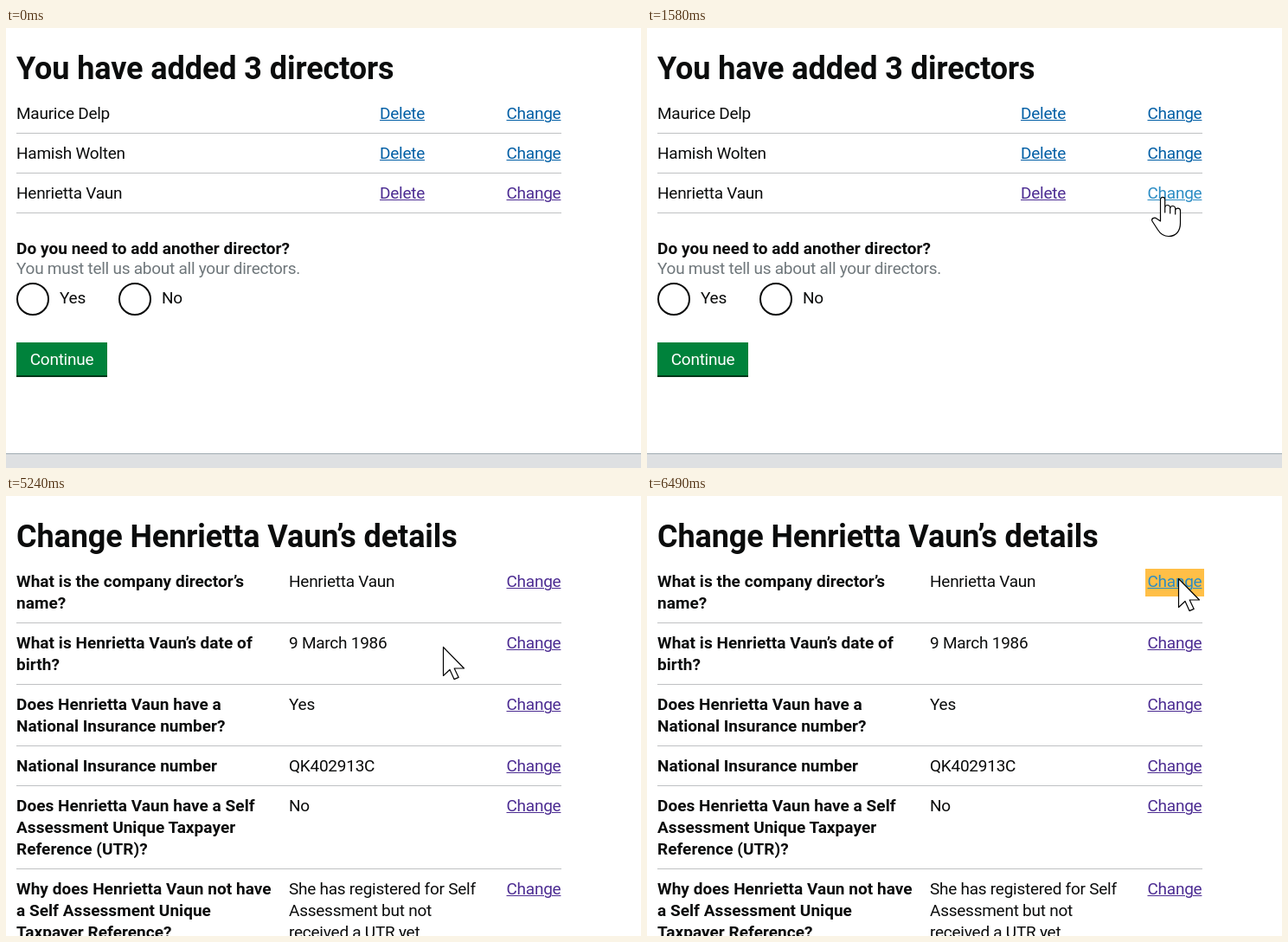
Animation of 734x508 px, one loop 8 s. Source, as an HTML page:

```html
<!DOCTYPE html>
<html lang="en">
<head>
<meta charset="utf-8">
<style>
html, body { margin: 0; width: 100%; height: 100%; overflow: hidden; background: #fff; }
#stage { position: relative; width: 734px; height: 508px; overflow: hidden; color: #0b0c0c; font: 19px/25px Roboto, sans-serif; letter-spacing: -.25px; white-space: pre; }
.page, .at { position: absolute; }
.page { inset: 0; }
h1 { position: absolute; left: 12px; top: 27px; margin: 0; font-size: 36px; line-height: 40px; letter-spacing: -.1px; }
.rows { position: absolute; left: 12px; top: 76px; width: 630px; }
.row { position: relative; padding: 10px 0; border-bottom: 1px solid #bfc1c3; }
.row span, .row a { position: absolute; top: 10px; }
b { letter-spacing: .04px; }
a { color: #005ea5; text-decoration: underline 1px; text-underline-offset: 1px; z-index: 0; }
a.visited { color: #4c2c92; }
a.hover { color: #2b8cc4; }
a.focus::before { content: ""; position: absolute; inset: -2px -3px -5px; background: #ffbf47; z-index: -1; }
.radio { width: 34px; height: 34px; border: 2px solid #0b0c0c; border-radius: 50%; top: 294px; }
.button { left: 12px; top: 363px; width: 105px; height: 38px; line-height: 39px; text-align: center; color: #fff; background: #00823b; border-bottom: 2px solid #003618; }
.footer { left: 0; right: 0; top: 491px; height: 17px; background: #dee0e2; border-top: 1px solid #a1acb2; }
svg { position: absolute; left: 0; top: 0; overflow: visible; fill: #fff; stroke: #000; stroke-width: 1.2; stroke-linejoin: round; }
</style>
</head>
<body>
<div id="stage">
  <div class="page" id="list">
    <h1>You have added 3 directors</h1>
    <div class="rows"></div>
    <b class="at" style="left:12px;top:242px">Do you need to add another director?</b>
    <div class="at" style="left:12px;top:265px;color:#6f777b">You must tell us about all your directors.</div>
    <div class="at radio" style="left:12px"></div><div class="at" style="left:62px;top:299px">Yes</div>
    <div class="at radio" style="left:130px"></div><div class="at" style="left:180px;top:299px">No</div>
    <div class="at button">Continue</div>
    <div class="at footer"></div>
  </div>
  <div class="page" id="details">
    <h1></h1>
    <div class="rows"></div>
  </div>
  <svg width="1" height="1">
    <path id="arrow" d="M.5.5V33.5L8 26.5 13 37.6 18.2 35.4 13.2 25H24.5Z"/>
    <path id="hand" d="M-2.5 28V3a2.6 2.6 0 0 1 5.2 0V18V12.5a3 3 0 0 1 6 0V19V13.5a3 3 0 0 1 6 0V20V16a2.8 2.8 0 0 1 5.8 0V30C20.5 40 15 45.5 7 45.5C0 45.5-3 42-5.5 38L-12 28C-13.5 25-9.5 23-7 25Z"/>
  </svg>
</div>
<script>
const LOOP = 8000, PAGE_CHANGE = 4320;
const person = "Henrietta Vaun";
const $ = selector => document.querySelector(selector);

const cell = (x, text) => `<span style="left:${x}px">${text}</span>`;
const link = (x, text, visited) => `<a class="${visited ? "visited" : ""}" style="left:${x}px">${text}</a>`;
const row = (head, rest) => `<div class="row">${head}${rest}</div>`;

$("#list .rows").innerHTML = ["Maurice Delp", "Hamish Wolten", person].map((name, i) =>
  row(name, link(420, "Delete", i == 2) + link(566.5, "Change", i == 2))).join("");

$("#details h1").textContent = `Change ${person}’s details`;
$("#details .rows").innerHTML = [
  ["What is the company director’s\nname?", person],
  [`What is ${person}’s date of\nbirth?`, "9 March 1986"],
  [`Does ${person} have a\nNational Insurance number?`, "Yes"],
  ["National Insurance number", "QK402913C"],
  [`Does ${person} have a Self\nAssessment Unique Taxpayer\nReference (UTR)?`, "No"],
  [`Why does ${person} not have\na Self Assessment Unique\nTaxpayer Reference?`,
    "She has registered for Self\nAssessment but not\nreceived a UTR yet"]
].map(([question, answer]) =>
  row(`<b>${question}</b>`, cell(315, answer) + link(566.5, "Change", true))).join("");

// Each pointer stroke is a quadratic curve: from, bend, to
const strokes = [
  { start: 330, end: 800, steps: 6, from: [716, 223], bend: [707, 204], to: [593, 211] },
  { start: 1030, end: 1190, steps: 2, from: [594, 203], bend: [595, 198], to: [596, 195] },
  { start: 4840, end: 5010, steps: 2, from: [597, 195], bend: [598, 195], to: [599, 195] },
  { start: 5160, end: 5470, steps: 4, from: [565, 189], bend: [440, 158], to: [351, 131] },
  { start: 5470, end: 6090, steps: 8, from: [351, 131], bend: [616, 99], to: [614, 95] }
];
const targets = [
  { link: $("#list .row:last-child a:last-child"), hover: 1030, arrow: 2440, focus: 2610 },
  { link: $("#details .row a"), hover: 5940, arrow: 6490, focus: 6490 }
];

// The pointer moves in discrete steps; the slack absorbs uneven step lengths
function pointAt(t, { start, end, steps, from, bend, to }) {
  const step = Math.floor((t - start) / (end - start) * steps + 0.25);
  const u = Math.min(step / steps, 1), v = 1 - u;
  return from.map((p, i) => Math.round(v * v * p + 2 * u * v * bend[i] + u * u * to[i]));
}

function draw(t) {
  $("#list").hidden = t >= PAGE_CHANGE;
  $("#details").hidden = t < PAGE_CHANGE;
  let hand = false;
  for (const { link, hover, arrow, focus } of targets) {
    link.classList.toggle("hover", t >= hover);
    link.classList.toggle("focus", t >= focus);
    hand ||= t >= hover && t < arrow;
  }
  const stroke = strokes.findLast(({ start }) => start <= t);
  $("svg").style.display = stroke ? "" : "none";
  if (stroke) {
    const [x, y] = pointAt(t, stroke);
    $("svg").style.transform = `translate(${x}px,${y}px)`;
  }
  $("#arrow").style.display = hand ? "none" : "";
  $("#hand").style.display = hand ? "" : "none";
}

const start = performance.now();
(function frame() {
  draw((performance.now() - start) % LOOP);
  requestAnimationFrame(frame);
})();
</script>
</body>
</html>
```
